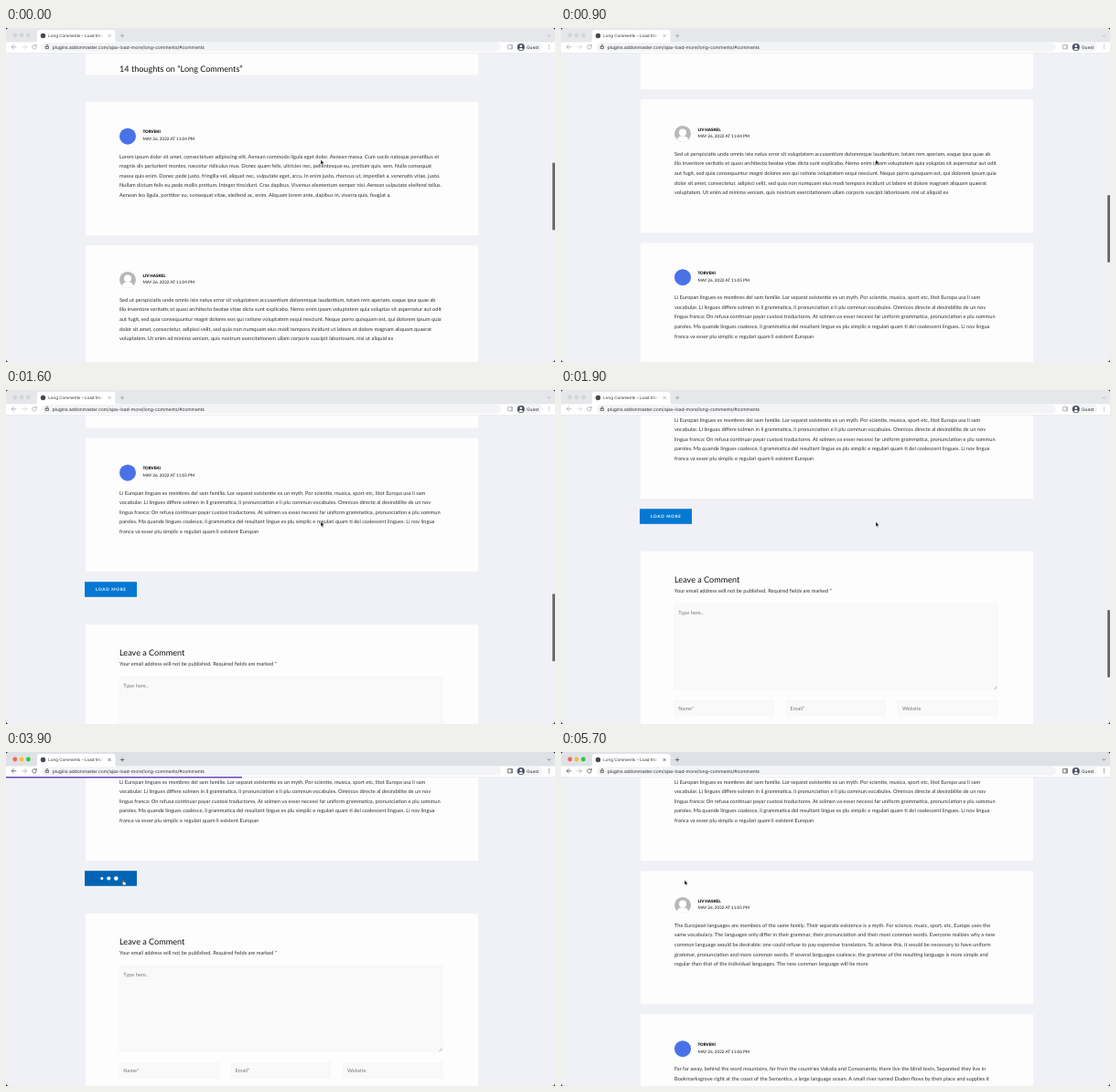
Animation of 600 by 366 pixels, one loop 5.8 s. Source, as an HTML page:

```html
<!DOCTYPE html>
<html lang="en">
<head>
<meta charset="utf-8">
<title>Long Comments</title>
<style>
  html, body { margin: 0; width: 100%; height: 100%; overflow: hidden; background: #222; }
  svg { display: block; width: 600px; height: 366px; border-radius: 3.5px; overflow: hidden; text-rendering: geometricPrecision; }
  text { font-family: Lato, sans-serif; font-size: 5.69px; fill: #303030; white-space: pre; }
  .ui text { font-family: Inter, sans-serif; font-size: 4.97px; fill: #2a2c30; }
  .card { fill: #fdfdfd; }
  .title { font-size: 9.1px; fill: #111; }
  .meta { font-size: 4.6px; fill: #111; }
  .name { font-size: 4.5px; font-weight: 900; }
  .field { fill: #f9f9f9; stroke: #efefef; stroke-width: .4; }
  .hint { fill: #777; }
  #label { font-size: 4.6px; font-weight: 700; letter-spacing: .7px; fill: #fff; }
  .line { fill: none; stroke-width: .8; stroke-linecap: round; stroke-linejoin: round; }
</style>
</head>
<body>
<svg viewBox="0 0 600 366">
  <rect width="600" height="366" fill="#f0f1f6"/>

  <g id="page">
    <rect class="card" x="87" y="0" width="429" height="51.5"/>
    <text class="title" x="124" y="48">14 thoughts on “Long Comments”</text>
    <g id="old"></g>
    <g id="new"></g>
    <g id="tail">
      <rect id="button" x="86" y="552.7" width="57" height="16.6"/>
      <text id="label" x="98" y="562.7">LOAD MORE</text>
      <g id="dots" fill="#fff">
        <circle cx="104.8" cy="561"/><circle cx="112.3" cy="561"/><circle cx="120.3" cy="561"/>
      </g>
      <g transform="translate(0 422.5)">
        <rect class="card" x="87" y="177" width="429" height="260"/>
        <text class="title" x="124" y="210.5">Leave a Comment</text>
        <text x="124" y="222">Your email address will not be published. Required fields are marked *</text>
        <rect class="field" x="124" y="234" width="353" height="94.5"/>
        <text class="hint" x="128.3" y="245.8">Type here..</text>
        <path class="line" style="stroke-width:.4" stroke="#777" d="M473.5 327.5l2.8-2.8M475 327.5l1.3-1.3"/>
        <g id="fields"></g>
      </g>
    </g>
  </g>

  <rect id="thumb" x="597.2" width="2.8" height="74" rx="1.2" fill="#66676a"/>

  <g class="ui">
    <rect id="strip" width="600" height="17"/>
    <path d="M31 16.5q3 0 3-3V5q0-3 3-3h79.5q3 0 3 3v8.5q0 3 3 3z" fill="#fff"/>
    <g id="lights"><circle cx="9.8" cy="8"/><circle cx="17.1" cy="8"/><circle cx="24.4" cy="8"/></g>
    <circle cx="40.5" cy="8.5" r="2.7" fill="#46494d"/>
    <text x="46.3" y="10.2" style="font-size:4.5px">Long Comments – Load Mor</text>
    <rect x="98" y="4" width="10" height="9" fill="url(#fade)"/>
    <rect y="15.5" width="600" height="12" fill="#fff"/>
    <rect x="39" y="16" width="502" height="9.8" rx="4.9" fill="#f3f4f6"/>
    <rect y="27" width="600" height=".5" fill="#dcdee1"/>
    <g id="icons" class="line">
      <path d="M111.9 7.3l2.4 2.4m0-2.4l-2.4 2.4M125.2 8.5h3.8m-1.9-1.9v3.8M592.1 7.9l1.3 1.3 1.3-1.3"/>
      <path d="M11 20.8H6.3m2.2-2.2l-2.2 2.2 2.2 2.2"/>
      <path stroke-opacity=".45" d="M17.8 20.8h4.7m-2.2-2.2l2.2 2.2-2.2 2.2"/>
      <path d="M33 19.5a2.3 2.3 0 1 0 .3 1.9M33.3 18.3v1.6h-1.6"/>
      <path d="M549 18.6h4.4v4.3H549zM552.2 18.8v3.9"/>
      <path stroke-width="1.1" d="M593.5 18.9v.01m0 1.9v.01m0 1.9v.01"/>
    </g>
    <path class="line" stroke="#54585d" d="M44 20.2v-.8a1 1 0 0 1 2 0v.8M43.5 20.5h3v2h-3z"/>
    <text x="50.7" y="22.6">plugins.addonmaster.com/ajax-load-more/long-comments/#comments</text>
    <rect x="557" y="16" width="29" height="9.8" rx="4.9" fill="#f3f4f6"/>
    <circle cx="562.8" cy="20.9" r="4" fill="#4b5160"/>
    <circle cx="562.8" cy="19.8" r="1.3" fill="#fff"/>
    <path d="M560.3 23.3q2.5-2.8 5 0-2.5 1.9-5 0z" fill="#fff"/>
    <text x="569" y="22.6" style="font-size:4.8px">Guest</text>
  </g>

  <rect id="bar" y="27" height="1.5" fill="#6843bd"/>

  <g id="pointer" stroke="#fff" stroke-width=".4" stroke-linejoin="round">
    <path id="arrow" fill="#000" d="M0 0v5l1.2-1 .8 1.8.9-.4-.8-1.7h1.6z"/>
    <path id="hand" fill="#fff" stroke="#111" d="M-.5 3.2V.5q.55-.8 1.1 0v1.6l2.2.5q.5.2.4.8l-.4 2.3H.4L-1.3 3.7q0-.9.8-.5z"/>
  </g>

  <defs>
    <linearGradient id="fade"><stop stop-color="#fff" stop-opacity="0"/><stop offset="1" stop-color="#fff"/></linearGradient>
  </defs>
</svg>

<script>
const $ = id => document.getElementById(id);
const LOOP = 5800, STEP = 157.25;
const A = "TORVEKI", B = "LIV HASKEL";

const comments = [
  [A, "04", `Lorem ipsum dolor sit amet, consectetuer adipiscing elit. Aenean commodo ligula eget dolor. Aenean massa. Cum sociis natoque penatibus et
magnis dis parturient montes, nascetur ridiculus mus. Donec quam felis, ultricies nec, pellentesque eu, pretium quis, sem. Nulla consequat
massa quis enim. Donec pede justo, fringilla vel, aliquet nec, vulputate eget, arcu. In enim justo, rhoncus ut, imperdiet a, venenatis vitae, justo.
Nullam dictum felis eu pede mollis pretium. Integer tincidunt. Cras dapibus. Vivamus elementum semper nisi. Aenean vulputate eleifend tellus.
Aenean leo ligula, porttitor eu, consequat vitae, eleifend ac, enim. Aliquam lorem ante, dapibus in, viverra quis, feugiat a,`],
  [B, "04", `Sed ut perspiciatis unde omnis iste natus error sit voluptatem accusantium doloremque laudantium, totam rem aperiam, eaque ipsa quae ab
illo inventore veritatis et quasi architecto beatae vitae dicta sunt explicabo. Nemo enim ipsam voluptatem quia voluptas sit aspernatur aut odit
aut fugit, sed quia consequuntur magni dolores eos qui ratione voluptatem sequi nesciunt. Neque porro quisquam est, qui dolorem ipsum quia
dolor sit amet, consectetur, adipisci velit, sed quia non numquam eius modi tempora incidunt ut labore et dolore magnam aliquam quaerat
voluptatem. Ut enim ad minima veniam, quis nostrum exercitationem ullam corporis suscipit laboriosam, nisi ut aliquid ex`],
  [A, "05", `Li Europan lingues es membres del sam familie. Lor separat existentie es un myth. Por scientie, musica, sport etc, litot Europa usa li sam
vocabular. Li lingues differe solmen in li grammatica, li pronunciation e li plu commun vocabules. Omnicos directe al desirabilite de un nov
lingua franca: On refusa continuar payar custosi traductores. At solmen va esser necessi far uniform grammatica, pronunciation e plu sommun
paroles. Ma quande lingues coalesce, li grammatica del resultant lingue es plu simplic e regulari quam ti del coalescent lingues. Li nov lingua
franca va esser plu simplic e regulari quam li existent Europan`],
  [B, "05", `The European languages are members of the same family. Their separate existence is a myth. For science, music, sport, etc, Europe uses the
same vocabulary. The languages only differ in their grammar, their pronunciation and their most common words. Everyone realizes why a new
common language would be desirable: one could refuse to pay expensive translators. To achieve this, it would be necessary to have uniform
grammar, pronunciation and more common words. If several languages coalesce, the grammar of the resulting language is more simple and
regular than that of the individual languages. The new common language will be more`],
  [A, "06", `Far far away, behind the word mountains, far from the countries Vokalia and Consonantia, there live the blind texts. Separated they live in
Bookmarksgrove right at the coast of the Semantics, a large language ocean. A small river named Duden flows by their place and supplies it`]
];

const person = `<circle cx="133" cy="37.7" r="9" fill="#b8b8b8"/>
  <circle cx="133" cy="36.3" r="4" fill="#fff"/>
  <path d="M126.8 44.2q1.2-4.2 6.200-4.200t6.200 4.200a9 9 0 0 1-12.400 0z" fill="#fff"/>`;
const disc = `<circle cx="133" cy="37.7" r="9" fill="#4a72e8"/>`;

function card([name, minute, body], i) {
  const lines = body.split("\n").map((s, n) => `<text x="124" y="${61.6 + n * 10.63}">${s}</text>`);
  return `<g transform="translate(0 ${81 + i * STEP})">
    <rect class="card" x="87" width="429" height="146"/>${name == A ? disc : person}
    <text class="meta name" x="149.4" y="34.4">${name}</text>
    <text class="meta" x="149.4" y="42.2">MAY 26, 2022 AT 11:${minute} PM</text>${lines.join("")}</g>`;
}

const cards = comments.map(card);
$("old").innerHTML = cards.slice(0, 3).join("");
$("new").innerHTML = cards.slice(3).join("");
$("fields").innerHTML = ["Name*", "Email*", "Website"].map((s, i) =>
  `<rect class="field" x="${124 + i * 122.3}" y="340.5" width="108.4" height="16.5"/>
   <text class="hint" x="${128.3 + i * 122.3}" y="350.7">${s}</text>`).join("");

const clamp = x => Math.min(1, Math.max(0, x));
const ease = x => x * x * (3 - 2 * x);

// keys: [time, value, slope per ms]; cubic Hermite when slopes are given, else linear
function track(keys, t) {
  if (t <= keys[0][0]) return keys[0][1];
  for (let i = 1; i < keys.length; i++) {
    const [t0, a, m0] = keys[i - 1], [t1, b, m1] = keys[i];
    if (t > t1) continue;
    const d = t1 - t0, u = (t - t0) / d;
    if (m0 === undefined) return a + (b - a) * u;
    return a + (b - a) * ease(u) + d * u * (1 - u) * (m0 * (1 - u) - m1 * u);
  }
  return keys[keys.length - 1][1];
}

const scrollKeys = [[200, 0, 0], [500, 50, .27], [900, 160, .2], [1300, 229.5, .22], [1900, 422.5, 0]];
const barKeys = [[3300, 0], [3900, 258], [4400, 370], [5000, 456], [5600, 586]];

const set = (el, attrs) => { for (const k in attrs) el.setAttribute(k, attrs[k]); };
const show = (id, on) => set($(id), { visibility: on ? "visible" : "hidden" });

function draw(t) {
  const scroll = track(scrollKeys, t);
  const active = t >= 3100, loading = t >= 3300, loaded = t >= 5400;
  const hover = t >= 2900 && !loaded;

  set($("page"), { transform: `translate(0 ${-scroll})` });
  set($("tail"), { transform: `translate(0 ${loaded ? 2 * STEP : 0})` });
  show("new", loaded);
  set($("thumb"), { y: 147.5 + scroll * .2214, opacity: 1 - clamp((t - 2300) / 300) });

  set($("button"), { fill: hover ? "#0064b4" : "#0478d2" });
  show("label", !loading);
  show("dots", loading);
  [...$("dots").children].forEach((dot, i) =>
    set(dot, { r: 1.75 + .5 * Math.sin((t - 3900) / 1000 * 2 * Math.PI - .4 + i * 1.1) }));

  set($("strip"), { fill: active ? "#dee1e6" : "#e5e7ea" });
  set($("icons"), { stroke: active ? "#54585d" : "#a4a7ab" });
  ["#fe5f57", "#febc2e", "#28c840"].forEach((c, i) =>
    set($("lights").children[i], { r: 2.4, fill: active ? c : "#d3d5d8" }));
  set($("bar"), { width: t < 5700 ? track(barKeys, t) : 0 });

  const go = ease(clamp((t - 2100) / 900)), leave = ease(clamp((t - 5100) / 300));
  set($("pointer"), { transform: `translate(${344 - 216 * go + 7 * leave} ${144.6 - 4.4 * go + .3 * leave})` });
  show("arrow", !hover);
  show("hand", hover);
}

const start = performance.now();
function tick() {
  const t = (performance.now() - start) % LOOP;
  draw(Math.floor(t / 100) * 100);
  requestAnimationFrame(tick);
}
tick();
</script>
</body>
</html>
```
